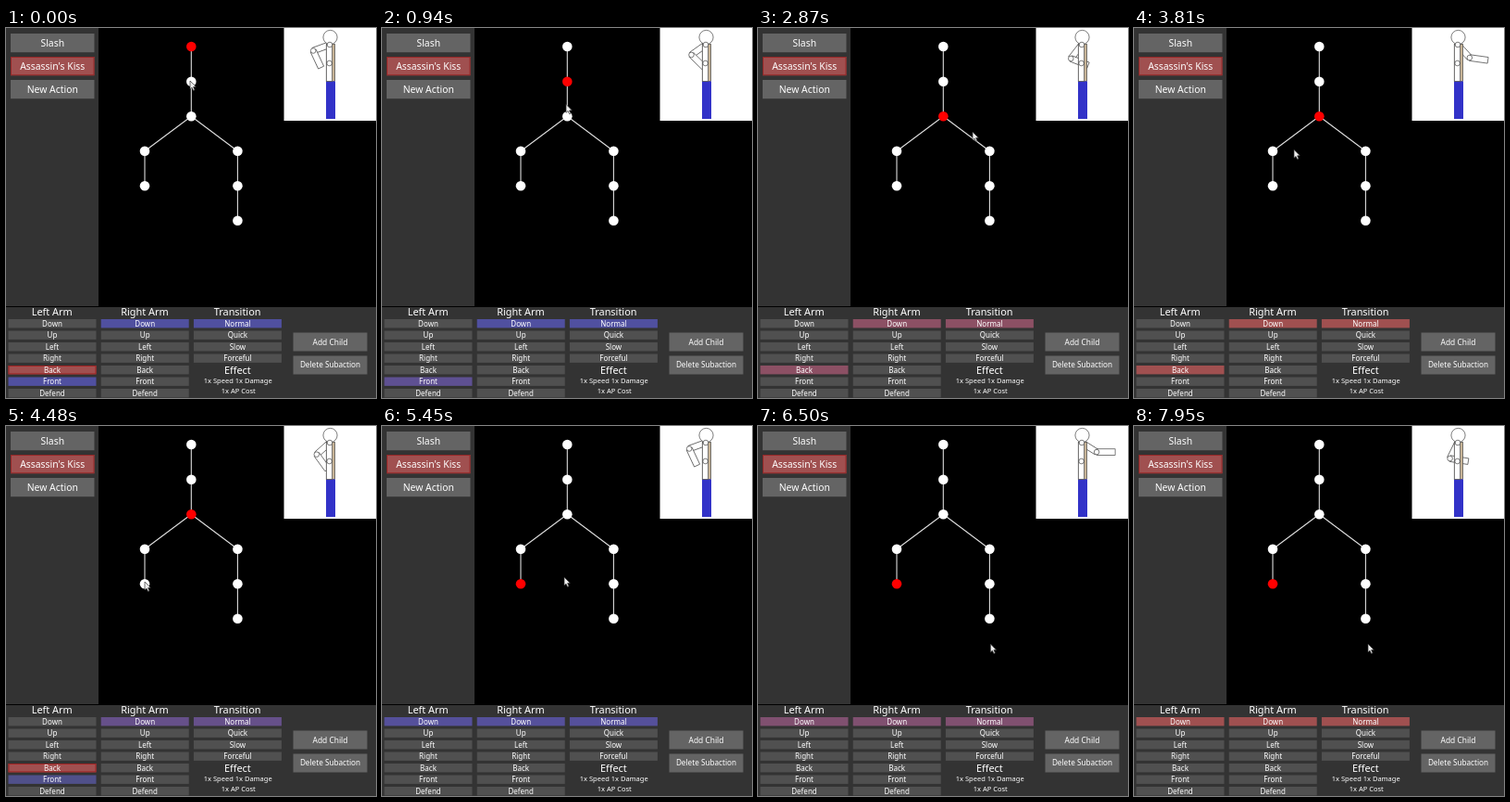
An HTML page with a canvas that plays this animation: 400x399 px, repeating every 8000 ms.

```html
<!DOCTYPE html>
<html lang="en">
<head>
<meta charset="utf-8">
<title>Action editor</title>
<style>
html, body { margin: 0; width: 100%; height: 100%; overflow: hidden; background: #000; }
canvas { display: block; width: 400px; height: 399px; }
</style>
</head>
<body>
<canvas id="stage"></canvas>
<script>
const W = 400, H = 399, LOOP = 8000, TICK = 134.5;
const FONT = '"Noto Sans", "Open Sans", sans-serif';
const canvas = document.getElementById('stage');
const ctx = canvas.getContext('2d');
const dpr = window.devicePixelRatio || 1;
canvas.width = Math.round(W * dpr);
canvas.height = Math.round(H * dpr);
ctx.scale(canvas.width / W, canvas.height / H);

const GREY = [80, 80, 80], BLUE = [80, 80, 160], RED = [160, 80, 80];

// Keys are [time, ...values], linear in between.
function track(keys, t) {
  let a = keys[0];
  for (const b of keys) {
    if (t < b[0]) {
      const k = (t - a[0]) / (b[0] - a[0]);
      return a.slice(1).map((v, i) => v + (b[i + 1] - v) * k);
    }
    a = b;
  }
  return a.slice(1);
}
const fade = (...steps) => steps.map(([t, c]) => [t, ...c]);

const shared = fade([0, BLUE], [2030, BLUE], [3090, RED], [3900, RED], [4640, BLUE], [5250, BLUE], [7250, RED]);
const leftArm = {
  Down: fade([0, GREY], [4700, GREY], [5150, BLUE], [5250, BLUE], [7250, RED]),
  Back: fade([0, RED], [280, RED], [800, GREY], [1100, GREY], [1550, BLUE], [2030, BLUE], [3090, RED], [4700, RED], [5150, GREY]),
  Front: fade([0, BLUE], [700, BLUE], [1300, RED], [2030, RED], [2600, GREY], [3900, GREY], [4640, BLUE], [4750, BLUE], [5150, GREY])
};
const framed = { Back: [[0, 280], [4100, 4900]], Front: [[1200, 2030]] };

const moves = ['Down', 'Up', 'Left', 'Right', 'Back', 'Front', 'Defend'];
const columns = [
  { title: 'Left Arm', rows: moves, fades: leftArm, framed },
  { title: 'Right Arm', rows: moves, fades: { Down: shared }, framed: {} },
  { title: 'Transition', rows: ['Normal', 'Quick', 'Slow', 'Forceful'], fades: { Normal: shared }, framed: {} }
];

const nodes = [[200.3, 20], [200.3, 57.7], [200.3, 95.3], [150, 132.7], [150, 170.3], [250.4, 132.7], [250.4, 170.3], [250.4, 207.8]];
const parents = [-1, 0, 1, 2, 3, 2, 5, 6];
const selectedAt = t => t < 280 ? 0 : t < 2030 ? 1 : t < 4900 ? 2 : 4;

const pointer = [
  [0, 199, 57], [300, 199, 57], [1100, 199, 97], [2030, 199, 97], [2824, 232, 112],
  [3300, 246, 125], [3900, 152, 133], [4438, 150, 168], [5200, 150, 168],
  [5380, 197, 163], [6300, 251, 235], [7200, 253, 235]
];

// Each swing: start, end, and whether the arm goes forward.
const swings = [
  [700, 1600, true], [2030, 2550, false], [2600, 3500, true], [3650, 4600, false],
  [5480, 6400, true], [6650, 7520, false], [7580, 8620, true]
];
const forwardFore = [[0, 65], [0.25, 21], [0.35, 8], [1, 0]];

function armPose(t) {
  let pose = [160, 65];
  for (const [start, end, forward] of swings) {
    if (t < start) break;
    const k = Math.min(1, (t - start) / (end - start));
    pose = forward ? [160 - 128 * k, track(forwardFore, k)[0]] : [32 + 128 * k, 65 * k];
  }
  return pose.map(a => a * Math.PI / 180);
}

function rect(x, y, w, h, fill) {
  ctx.fillStyle = fill;
  ctx.fillRect(x, y, w, h);
}

function text(s, x, y, size, weight = 400) {
  ctx.font = `${weight} ${size}px ${FONT}`;
  ctx.textAlign = 'center';
  ctx.textBaseline = 'alphabetic';
  ctx.fillStyle = '#fff';
  ctx.fillText(s, x, y + size * 0.36);
}

function button(s, x, y, w, h, size, fill, edge) {
  rect(x, y, w, h, fill);
  if (edge) {
    ctx.strokeStyle = edge;
    ctx.lineWidth = 1;
    ctx.strokeRect(x + 0.5, y + 0.5, w - 1, h - 1);
  }
  text(s, x + w / 2, y + h / 2, size);
}

function circle(x, y, r, fill, stroke) {
  ctx.beginPath();
  ctx.arc(x, y, r, 0, 7);
  if (fill) { ctx.fillStyle = fill; ctx.fill(); }
  if (stroke) { ctx.strokeStyle = stroke; ctx.stroke(); }
}

function drawPanels(t) {
  rect(0, 0, W, H, '#000');
  rect(0, 0, 100, 300, '#333');
  rect(0, 301, W, 98, '#333');
  ['Slash', 'Assassin\'s Kiss', 'New Action'].forEach((s, i) => {
    const on = i === 1;
    button(s, 5, 6 + 25 * i, 90.5, 20.2, 10.4, on ? '#a05050' : '#646464', on && '#962828');
  });

  columns.forEach((col, c) => {
    const x = 2.5 + 100.2 * c;
    text(col.title, x + 47.2, 306.5, 10.9, 500);
    col.rows.forEach((s, i) => {
      const keys = col.fades[s] || [[0, ...GREY]];
      const edged = (col.framed[s] || []).some(([a, b]) => t >= a && t < b);
      button(s, x, 314 + 12.5 * i, 95, 9.4, 8, `rgb(${track(keys, t).map(Math.round)})`, edged && '#a02323');
    });
  });
  text('Effect', 250.3, 369, 10.9, 500);
  text('1x Speed 1x Damage', 250.7, 380, 7.5);
  text('1x AP Cost', 251.2, 391, 7.5);
  button('Add Child', 310.5, 328.5, 80, 20, 8.4, '#646464');
  button('Delete Subaction', 310.5, 353.5, 80, 20, 8.2, '#646464');
}

function drawTree(t) {
  ctx.strokeStyle = '#ddd';
  ctx.lineWidth = 1.1;
  ctx.beginPath();
  nodes.forEach((n, i) => {
    if (parents[i] < 0) return;
    ctx.moveTo(...nodes[parents[i]]);
    ctx.lineTo(...n);
  });
  ctx.stroke();
  const selected = selectedAt(t);
  nodes.forEach(([x, y], i) => circle(x, y, 5.3, i === selected ? '#f00' : '#fff'));
}

function box(x, y, w, h, fill) {
  rect(x, y, w, h, fill);
  ctx.strokeRect(x, y, w, h);
}

function limb(x, y, angle, length) {
  ctx.save();
  ctx.translate(x, y);
  ctx.rotate(angle);
  box(0, -3.3, length, 6.6, '#fff');
  ctx.restore();
}

function drawFigure(t) {
  const ink = '#444';
  rect(300.5, 0, 99.5, 100, '#fff');

  // The left arm swings behind the body.
  const [upper, fore] = armPose(t);
  const sx = 350, sy = 18;
  const ex = sx + 19 * Math.cos(upper), ey = sy + 19 * Math.sin(upper);
  ctx.lineWidth = 0.7;
  ctx.strokeStyle = ink;
  limb(sx, sy, upper, 19);
  limb(ex, ey, fore, 20);
  circle(ex, ey, 2.8, '#fff', ink);

  box(346.3, 17.3, 9.2, 40.2, '#c8b496');
  rect(346, 57.5, 10, 40.5, '#3232c8');
  box(346.3, 17.8, 6.4, 39.7, '#fff');
  circle(350.5, 10, 7.6, '#fff', ink);
  circle(sx, sy, 2.8, '#fff', ink);
  circle(349.6, 38, 2.8, null, ink);
}

function drawPointer(t) {
  const [x, y] = track(pointer, t);
  ctx.save();
  ctx.translate(x, y);
  ctx.beginPath();
  [[0, 0], [0, 9], [2, 7.2], [3.6, 10.4], [5, 9.7], [3.6, 6.6], [6.3, 6.4]].forEach(p => ctx.lineTo(...p));
  ctx.closePath();
  ctx.fillStyle = '#eee';
  ctx.fill();
  ctx.strokeStyle = '#333';
  ctx.lineWidth = 0.7;
  ctx.stroke();
  ctx.restore();
}

function draw(now) {
  const t = Math.floor((now % LOOP) / TICK) * TICK;
  drawPanels(t);
  drawTree(t);
  drawFigure(t);
  drawPointer(t);
}

const start = performance.now();
function loop() {
  draw(performance.now() - start);
  requestAnimationFrame(loop);
}
loop();
</script>
</body>
</html>
```
